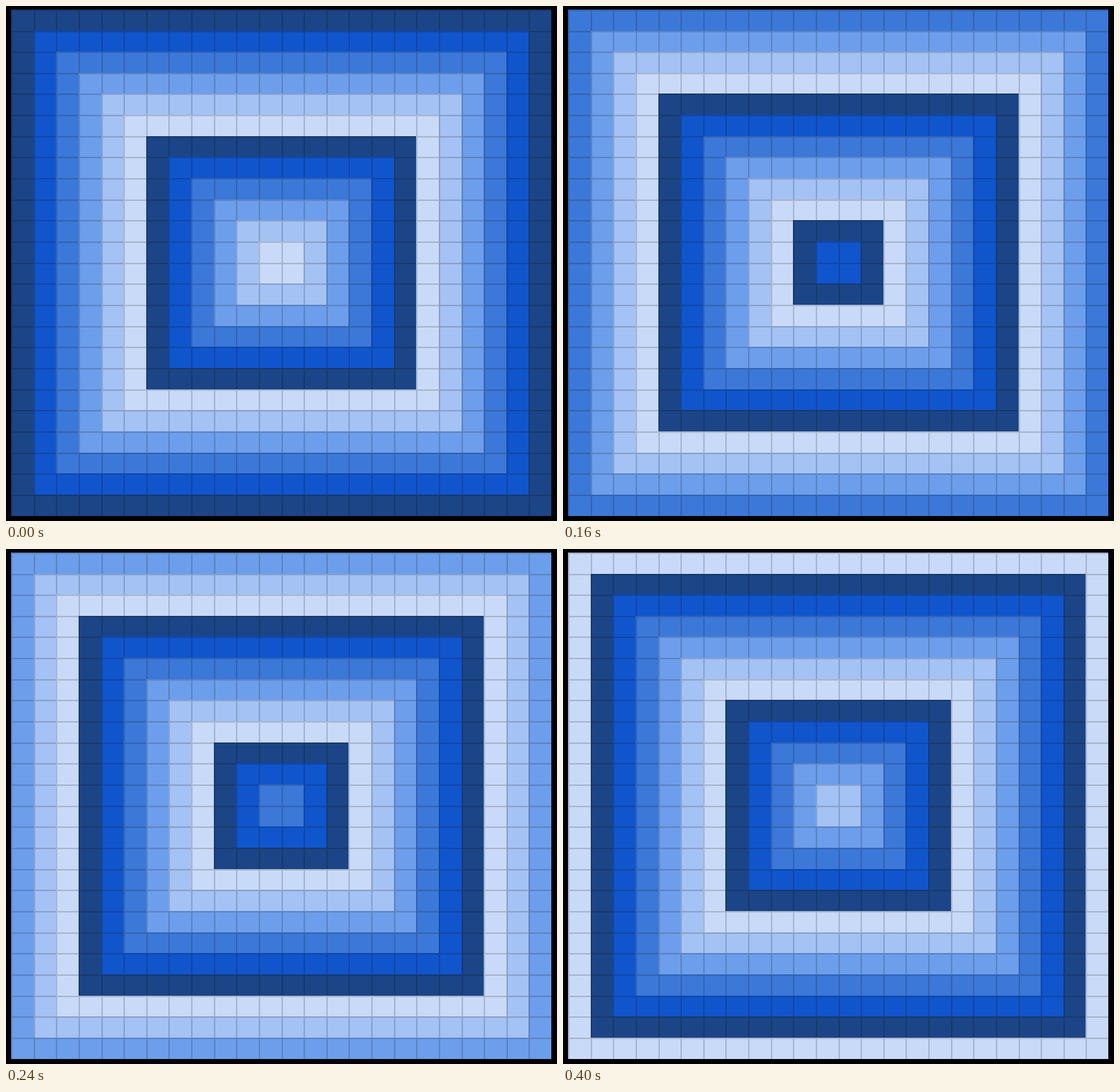
Recreate the animation shown at these times as an HTML page. Size 774x724 px, loop 0.48 s.

```html
<!DOCTYPE html>
<html lang="en">
<head>
<meta charset="utf-8">
<title>Pulsing squares</title>
<style>
  html, body { margin: 0; width: 100%; height: 100%; overflow: hidden; background: #000; }
  svg { display: block; }
  .ring { animation: pulse 480ms step-end infinite; }
  .grid { fill: #000; fill-opacity: .17; }
  @keyframes pulse {
    0%      { fill: #1c4587; }
    16.666% { fill: #1155cc; }
    33.333% { fill: #3c78d8; }
    50%     { fill: #6d9eeb; }
    66.666% { fill: #a4c2f4; }
    83.333% { fill: #c9daf8; }
    100%    { fill: #1c4587; }
  }
</style>
</head>
<body>
<svg id="stage" width="774" height="724" viewBox="0 0 774 724" shape-rendering="crispEdges"></svg>
<script>
  const CELLS = 24, COLORS = 6, STEP = 80, LINE = 2;
  const stage = document.getElementById('stage');
  const colX = i => Math.floor(7.5 + 31.625 * i);
  const rowY = i => Math.floor(5.35 + 29.66 * i);

  function add(tag, attrs) {
    const el = document.createElementNS('http://www.w3.org/2000/svg', tag);
    for (const name in attrs) el.setAttribute(name, attrs[name]);
    stage.appendChild(el);
  }

  // Nested squares, each one colour step ahead of the square around it
  for (let i = 0; i < CELLS / 2; i++) {
    const x = colX(i), y = rowY(i);
    add('rect', {
      class: 'ring', x, y,
      width: colX(CELLS - i) - x,
      height: rowY(CELLS - i) - y,
      style: `animation-delay: ${-STEP * (i % COLORS)}ms`
    });
  }

  // One path, so that crossings are not darkened twice
  const left = colX(0), top_ = rowY(0), right = colX(CELLS), bottom = rowY(CELLS);
  let d = '';
  for (let i = 0; i < CELLS; i++) {
    d += `M${colX(i)} ${top_}h${LINE}V${bottom}h${-LINE}z`;
    d += `M${left} ${rowY(i)}H${right}v${LINE}H${left}z`;
  }
  add('path', { class: 'grid', d });
</script>
</body>
</html>
```
